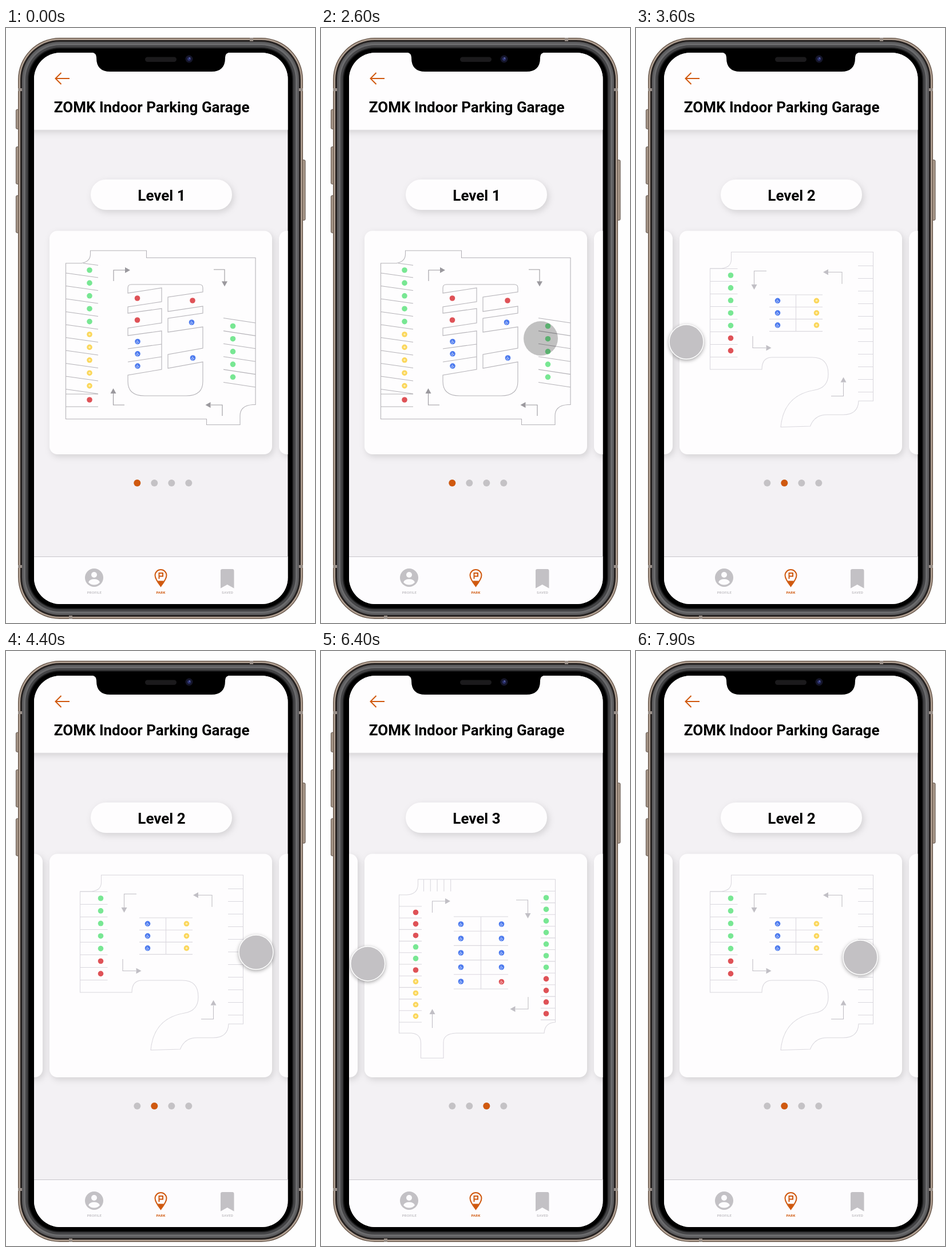
An HTML page for the animation above (8000 ms loop, 540x1037 px).

```html
<!DOCTYPE html>
<html lang="en">
<head>
<meta charset="utf-8">
<title>Parking levels</title>
<style>
  html, body { margin: 0; width: 100%; height: 100%; overflow: hidden; background: #fefefe; }
  svg { display: block; width: 100%; height: 100%; }
  text { font-family: Roboto, sans-serif; font-weight: 700; }
  .heading { font-size: 26px; }
  .tab { font-size: 6px; letter-spacing: .3px; text-anchor: middle; fill: #c3c1c5; }
  .raised { fill: #fefdfe; filter: drop-shadow(3px 4px 6px rgba(0, 0, 0, .13)); }
  .lines { fill: none; stroke-width: 1.1; }
  .accent { fill: none; stroke: #d0590f; stroke-width: 2; }
  .grey { fill: #c3c1c5; }
  #cursor { fill: #c3c1c4; stroke: #fff; stroke-width: 1.5; filter: drop-shadow(0 2px 3px rgba(0, 0, 0, .35)); }
  #cursor.pressed { fill: rgba(0, 0, 0, .24); stroke: none; filter: none; }
</style>
</head>
<body>
<svg viewBox="0 0 540 1037">
  <defs>
    <clipPath id="screen"><rect x="49" y="43" width="443.5" height="961" rx="46"/></clipPath>
  </defs>

  <g id="body"></g>

  <g clip-path="url(#screen)">
    <rect x="49" y="43" width="444" height="961" fill="#f3f1f4"/>
    <rect class="raised" x="30" y="30" width="480" height="147.5"/>
    <path class="accent" d="M111 88H86.5M96.5 78L86.5 88L96.5 98"/>
    <text class="heading" x="425.5" y="147" text-anchor="end">ZOMK Indoor Parking Garage</text>

    <rect class="raised" x="148" y="264" width="247" height="53" rx="26.5"/>
    <g id="labels" class="heading" text-anchor="middle"></g>
    <g id="cards"></g>
    <g id="pager"></g>

    <rect x="49" y="921" width="444" height="84" fill="#fdfcfe"/>
    <path d="M49 921.5H493" stroke="#c8c6cb"/>
    <circle class="grey" cx="154" cy="958" r="16"/>
    <g fill="#fdfcfe">
      <circle cx="154" cy="953" r="5"/>
      <path d="M144 966Q146 960.5 154 960.5T164 966Q160 970.5 154 970.5T144 966Z"/>
    </g>
    <path class="accent" d="M270.5 973Q260.500 960 260.500 954A10 10 0 0 1 280.500 954Q280.500 960 270.500 973Z"/>
    <path fill="#d0590f" d="M265 963.500H276L270.500 973Z"/>
    <path class="accent" d="M267.500 960V950H274V955.500H267.500"/>
    <path class="grey" d="M375 946Q375 943 378 943H395.500Q398.500 943 398.500 946V976.500L386.700 970L375 976.500Z"/>
    <text class="tab" x="154.500" y="985.500">PROFILE</text>
    <text class="tab" x="270.500" y="985.500" style="fill:#d0590f">PARK</text>
    <text class="tab" x="387" y="985.500">SAVED</text>
  </g>

  <path d="M149 42.500Q158 43 158 51V52Q158 76 182 76H359Q383 76 383 52V51Q383 43 392 42.500Z"/>
  <rect x="243" y="50.500" width="55" height="8.500" rx="4.200" fill="#1b1a1c"/>
  <circle cx="320" cy="54" r="6.500" fill="#15162b"/>
  <circle cx="320" cy="54" r="3" fill="#2c3270"/>
  <circle cx="321" cy="52.500" r="1" fill="#7b86c8"/>
  <circle id="cursor" r="30"/>
</svg>

<script>
const LOOP = 8000, PITCH = 401;
const $ = id => document.getElementById(id);
const range = (n, make) => Array.from({ length: n }, (_, i) => make(i)).join('');
const colors = { g: '#78e793', y: '#fbd75b', r: '#df5257', b: '#4b79ee' };

// Phone casing: side buttons, nested rims and antenna bands.
const button = (x, y, h) =>
  `<rect x="${x}" y="${y}" width="6" height="${h}" rx="2" fill="#a8988a" stroke="#5d5048"/>`;
const rim = ([inset, fill]) =>
  `<rect x="${21 + inset}" y="${17 + inset}" width="${498 - 2 * inset}" height="${1013 - 2 * inset}" rx="${73 - inset}" fill="${fill}"/>`;
const band = (x, y, w, h) => `<rect x="${x}" y="${y}" width="${w}" height="${h}" fill="#9b918a"/>`;
$('body').innerHTML =
  button(17.5, 142, 34) + button(17.5, 207, 65) + button(17.5, 292, 65) + button(517, 230, 105) +
  [[0, '#6b5b4f'], [1.5, '#b3a294'], [4, '#262221'], [7, '#5c5c5e'], [10, '#6b6b6d'],
   [13, '#444446'], [17, '#1c1c1d'], [19, '#000']].map(rim).join('') +
  band(426, 17, 6, 6) + band(110, 1024, 6, 6) +
  [105, 936].map(y => band(21, y, 7, 5) + band(512, y, 7, 5)).join('');

// Each letter of `kinds` is one parking space, placed down a column.
function spaces(x, y, step, kinds, marked) {
  return [...kinds].map((kind, i) => {
    const cy = y + i * step;
    let mark = '';
    if (kind === 'y') mark = `<circle cx="${x}" cy="${cy}" r="1.8" fill="#fdeeb4"/>`;
    if (kind === 'b' || marked)
      mark = `<path d="M${x - .7} ${cy - 2.5}V${cy + .3}H${x + 1.4}L${x + 2.2} ${cy + 2}M${x - 1.6} ${cy}A1.700 1.700 0 1 0 ${x + 1} ${cy + 1.7}" fill="none" stroke="#fff" stroke-width=".8" opacity=".8"/>`;
    return `<circle cx="${x}" cy="${cy}" r="4.8" fill="${colors[kind]}"/>${mark}`;
  }).join('');
}
// Stall dividers; `drop` slants them.
const stalls = (x1, x2, y, step, n, drop = 0) =>
  range(n, i => `M${x1} ${y + i * step}L${x2} ${y + i * step + drop}`);
const arrow = (path, x, y, angle, color) =>
  `<path class="lines" d="${path}" stroke="${color}"/>
   <path d="M0 0L-9 -5V5Z" transform="translate(${x} ${y}) rotate(${angle})" fill="${color}"/>`;
const plan = (d, color) => `<path class="lines" d="${d}" stroke="${color}"/>`;

const DARK = '#b5b3b8', LIGHT = '#dad8de', HEAD = '#9b999e', PALE = '#c1bfc5';

const level1 =
  plan('M147.5 388H245.5V400.5H436V656.5H431Q409 658 409 676V691.5H350.5V681.5H104.5V410H132Q147.5 407 147.5 394Z' +
    'M135 410L161 413.5M104.5 638H161M104.5 660H161' +
    stalls(104.5, 161, 427, 22.5, 10, 8) + stalls(380, 436, 505.5, 22.4, 6, 8.5) +
    'M213 462V453Q213 447 219 447H338Q344 447 344 453V460L283 469V494L344 485V497L283 506V530L344 521V558L283 569V593L344 582' +
    'V616Q344 641 315 641H242Q213 641 213 616V605L272 595V528L213 536V523L272 514V489L213 497V486L272 477V453Z' +
    'M213 559L272 551M213 582L272 573', DARK) +
  spaces(146, 422, 22.4, 'gggggyyyyy') + spaces(146, 648, 0, 'r') +
  spaces(396.5, 519.5, 22.2, 'ggggg') +
  spaces(229.5, 471, 38, 'rr') + spaces(230, 546.5, 21.3, 'bbb') +
  spaces(326, 475, 0, 'r') + spaces(324.5, 513, 0, 'b') + spaces(326.5, 575, 0, 'b') +
  arrow('M188 441V422H208', 217, 422, 0, HEAD) + arrow('M363 421H382V442', 382, 450.5, 90, HEAD) +
  arrow('M207 657H187.500V637', 187.5, 628, -90, HEAD) + arrow('M378 676V657H358', 348.5, 657, 180, HEAD);

const level2 =
  plan('M166.5 390.5H414.5V650H389Q388 674 362 674H334Q312 674 304.5 694L253 695.5Q258 640 312 631Q336 627 336 603Q336 574 308 574H238Q220 574 220 595H129.5V419H150Q166 417 166.5 404Z' +
    stalls(129.5, 177.5, 419.5, 22, 8) + stalls(388, 414.5, 414.5, 22, 11) +
    stalls(233, 326, 465, 21.2, 4) + 'M279.5 465V528.500', LIGHT) +
  spaces(165.5, 431, 21.9, 'gggggrr') + spaces(247.5, 475.3, 21.3, 'bbb') + spaces(315.5, 475.3, 21.3, 'yyy') +
  arrow('M228 423.500H206.500V447', 206.5, 456, 90, PALE) + arrow('M360 446V425.500H336', 327, 425.5, 180, PALE) +
  arrow('M204 537V557.500H227', 236.5, 557.5, 0, PALE) + arrow('M341 641.500H362.500V618', 362.5, 608.5, -90, PALE);

const level3 =
  plan('M169.5 398H409.5V647Q391 648 390 666H236Q214 667 214 682V709.5H174.5V683Q174 667 158 666H136.5V425H150Q169 424 169.5 407Z' +
    stalls(136.5, 176, 445, 20.2, 11) + stalls(384, 409.5, 418.5, 20.4, 12) +
    range(5, i => `M${179.5 + i * 11.8} 398V419`) +
    stalls(232, 327, 463, 25.2, 6) + 'M279.500 463V589', LIGHT) +
  spaces(165.5, 455.5, 20.1, 'rrrggryyyy') + spaces(393.5, 430, 20.2, 'gggggggrrrr') +
  spaces(244.5, 476, 25, 'bbbbb') + spaces(315.5, 476, 25, 'bbbb') + spaces(315.5, 576.5, 0, 'r', true) +
  arrow('M194.500 456V436H217', 226, 436, 0, PALE) + arrow('M341 434H361.500V457', 361.5, 466, 90, PALE) +
  arrow('M362 603V624H340', 330.5, 624, 180, PALE) + arrow('M194.500 657V633', 194.5, 624, -90, PALE);

$('cards').innerHTML = [level1, level2, level3, ''].map((map, i) =>
  `<g transform="translate(${i * PITCH} 0)"><rect class="raised" x="76" y="353.500" width="389" height="389.500" rx="14"/>${map}</g>`).join('');
$('labels').innerHTML = range(4, i => `<text x="272" y="301">Level ${i + 1}</text>`);
const pagerDots = fill => range(4, i => `<circle cx="${229.3 + 30 * i}" cy="793" r="6" fill="${fill}"/>`);
$('pager').innerHTML = `<g>${pagerDots('#c4c2c5')}</g><g>${pagerDots('#d0590f')}</g>`;

// Tracks hold [time, ...values]; values ease between neighbouring keys.
const cursorTrack = [
  [1350, 575, 502], [2200, 384, 541], [2600, 384, 541], [3300, 88, 547], [3600, 88, 547],
  [4400, 437, 525], [4600, 437, 525], [5270, 80, 545], [6350, 80, 545],
  [7030, 192, 537], [7200, 192, 537], [7850, 392, 534]
];
const levelTrack = [[2600, 0], [3450, 1], [4700, 1], [5540, 2], [7200, 2], [7880, 1]];
const presses = [[2550, 3300], [4550, 5270], [7150, 7850]];

function sample(track, t) {
  const next = track.findIndex(key => key[0] > t);
  if (next === 0) return track[0].slice(1);
  if (next < 0) return track.at(-1).slice(1);
  const [t0, ...from] = track[next - 1], [t1, ...to] = track[next];
  const u = (t - t0) / (t1 - t0), eased = u * u * (3 - 2 * u);
  return from.map((v, i) => v + (to[i] - v) * eased);
}

const fading = [$('labels'), $('pager').lastChild];
function draw(now) {
  const t = now % LOOP;
  const [level] = sample(levelTrack, t);
  const [x, y] = sample(cursorTrack, t);
  $('cards').setAttribute('transform', `translate(${-PITCH * level} 0)`);
  for (const group of fading)
    [...group.children].forEach((el, i) => el.setAttribute('opacity', Math.max(0, 1 - Math.abs(level - i))));
  const cursor = $('cursor');
  cursor.setAttribute('cx', x);
  cursor.setAttribute('cy', y);
  cursor.setAttribute('visibility', t < cursorTrack[0][0] ? 'hidden' : 'visible');
  cursor.classList.toggle('pressed', presses.some(([a, b]) => t >= a && t < b));
}

let start;
function frame(now) {
  start ??= now;
  draw(now - start);
  requestAnimationFrame(frame);
}
draw(0);
requestAnimationFrame(frame);
</script>
</body>
</html>
```
